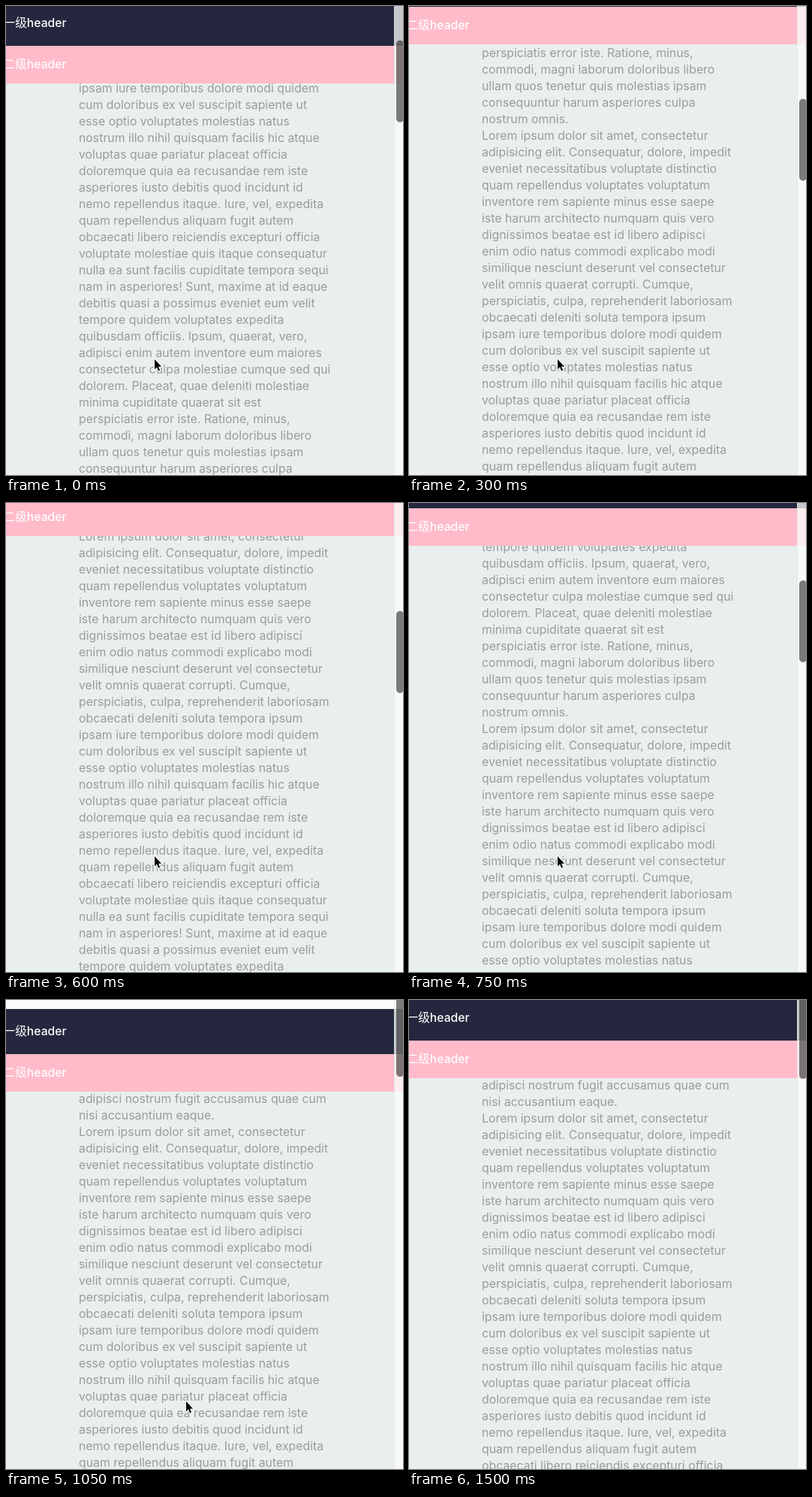
Write an HTML page that moves like this. It is 529x624 px and loops after 2.12 s.

```html
<!DOCTYPE html>
<html lang="zh-CN">
<head>
<meta charset="utf-8">
<title>Header</title>
<style>
@property --scroll { syntax: "<number>"; inherits: true; initial-value: 0; }
@property --shift { syntax: "<number>"; inherits: true; initial-value: 0; }
@property --x { syntax: "<number>"; inherits: true; initial-value: 198; }
@property --y { syntax: "<number>"; inherits: true; initial-value: 470; }

html, body { margin: 0; width: 100%; height: 100%; overflow: hidden; }
#stage {
  position: relative; width: 529px; height: 624px; overflow: hidden;
  background: #e9efee;
  font: 15.85px/22px Inter, "Noto Sans CJK SC", "Noto Sans CJK JP", sans-serif;
  animation: session 2120ms step-end infinite;
}
#stage > * { position: absolute; }

#text {
  left: 97px; top: 103px; color: #999c9c;
  transform: translateY(calc(var(--scroll) * -1px));
}
#text p { margin: 0; white-space: pre; }

#head {
  left: 0; top: -6px; width: 100%; color: #fff; font-size: 15.7px; font-weight: 500;
  box-shadow: 0 -40px #fafafa;
  transform: translateY(calc(var(--shift) * 1px));
}
#head div { text-indent: -3.5px; white-space: nowrap; }
.first { height: 60px; line-height: 60px; background: #24273d; }
.second { height: 50px; line-height: 50px; background: #ffbbc9; }

#track {
  left: 517px; top: 0; width: 12px; height: 100%; box-sizing: border-box;
  background: rgba(252, 252, 252, .75);
  border-left: 1px solid rgba(215, 230, 224, .6);
}
#thumb {
  left: 520px; top: -4px; width: 10px; height: 109px; border-radius: 5px;
  background: rgba(0, 0, 0, .51);
  transform: translateY(calc(var(--scroll) / 6.27 * 1px));
}
#cursor {
  left: -2px; top: -2px;
  transform: translate(calc(var(--x) * 1px), calc(var(--y) * 1px));
}

/* one step per 150 ms, the last one rests */
@keyframes session {
  0%       { --scroll: 312; --shift: -1;  --x: 198; --y: 470; }
  7.0755%  { --scroll: 350; --shift: 0;   --x: 198; --y: 470; }
  14.1509% { --scroll: 799; --shift: -53; --x: 198; --y: 470; }
  21.2264% { --scroll: 885; --shift: -58; --x: 198; --y: 470; }
  28.3019% { --scroll: 927; --shift: -60; --x: 198; --y: 470; }
  35.3774% { --scroll: 671; --shift: -47; --x: 198; --y: 470; }
  42.4528% { --scroll: 88;  --shift: -11.5; --x: 198; --y: 470; }
  49.5283% { --scroll: -18; --shift: 18;  --x: 240; --y: 534; }
  56.6038% { --scroll: -7;  --shift: 7;   --x: 285; --y: 597; }
  63.6792% { --scroll: -2;  --shift: 2;   --x: 306; --y: 640; }
  70.7547%, 100% { --scroll: 0; --shift: 0; --x: 306; --y: 640; }
}
</style>
</head>
<body>
<div id="stage">
  <div id="text"><p>adipisci nostrum fugit accusamus quae cum
nisi accusantium eaque.</p><p id="lorem">Lorem ipsum dolor sit amet, consectetur
adipisicing elit. Consequatur, dolore, impedit
eveniet necessitatibus voluptate distinctio
quam repellendus voluptates voluptatum
inventore rem sapiente minus esse saepe
iste harum architecto numquam quis vero
dignissimos beatae est id libero adipisci
enim odio natus commodi explicabo modi
similique nesciunt deserunt vel consectetur
velit omnis quaerat corrupti. Cumque,
perspiciatis, culpa, reprehenderit laboriosam
obcaecati deleniti soluta tempora ipsum
ipsam iure temporibus dolore modi quidem
cum doloribus ex vel suscipit sapiente ut
esse optio voluptates molestias natus
nostrum illo nihil quisquam facilis hic atque
voluptas quae pariatur placeat officia
doloremque quia ea recusandae rem iste
asperiores iusto debitis quod incidunt id
nemo repellendus itaque. Iure, vel, expedita
quam repellendus aliquam fugit autem
obcaecati libero reiciendis excepturi officia
voluptate molestiae quis itaque consequatur
nulla ea sunt facilis cupiditate tempora sequi
nam in asperiores! Sunt, maxime at id eaque
debitis quasi a possimus eveniet eum velit
tempore quidem voluptates expedita
quibusdam officiis. Ipsum, quaerat, vero,
adipisci enim autem inventore eum maiores
consectetur culpa molestiae cumque sed qui
dolorem. Placeat, quae deleniti molestiae
minima cupiditate quaerat sit est
perspiciatis error iste. Ratione, minus,
commodi, magni laborum doloribus libero
ullam quos tenetur quis molestias ipsam
consequuntur harum asperiores culpa
nostrum omnis.</p></div>
  <div id="head">
    <div class="first">一级header</div>
    <div class="second">二级header</div>
  </div>
  <div id="track"></div>
  <div id="thumb"></div>
  <svg id="cursor" width="16" height="24" viewBox="-2 -2 16 24">
    <path d="M0 0V13.4L3 10.6 5.1 15.6 7.1 14.7 5.1 9.8H9.2Z" stroke="#fff" stroke-width="2" paint-order="stroke"/>
  </svg>
</div>
<script>
const lorem = document.getElementById("lorem");
const copy = lorem.cloneNode(true);
copy.removeAttribute("id");
lorem.after(copy);
</script>
</body>
</html>
```
